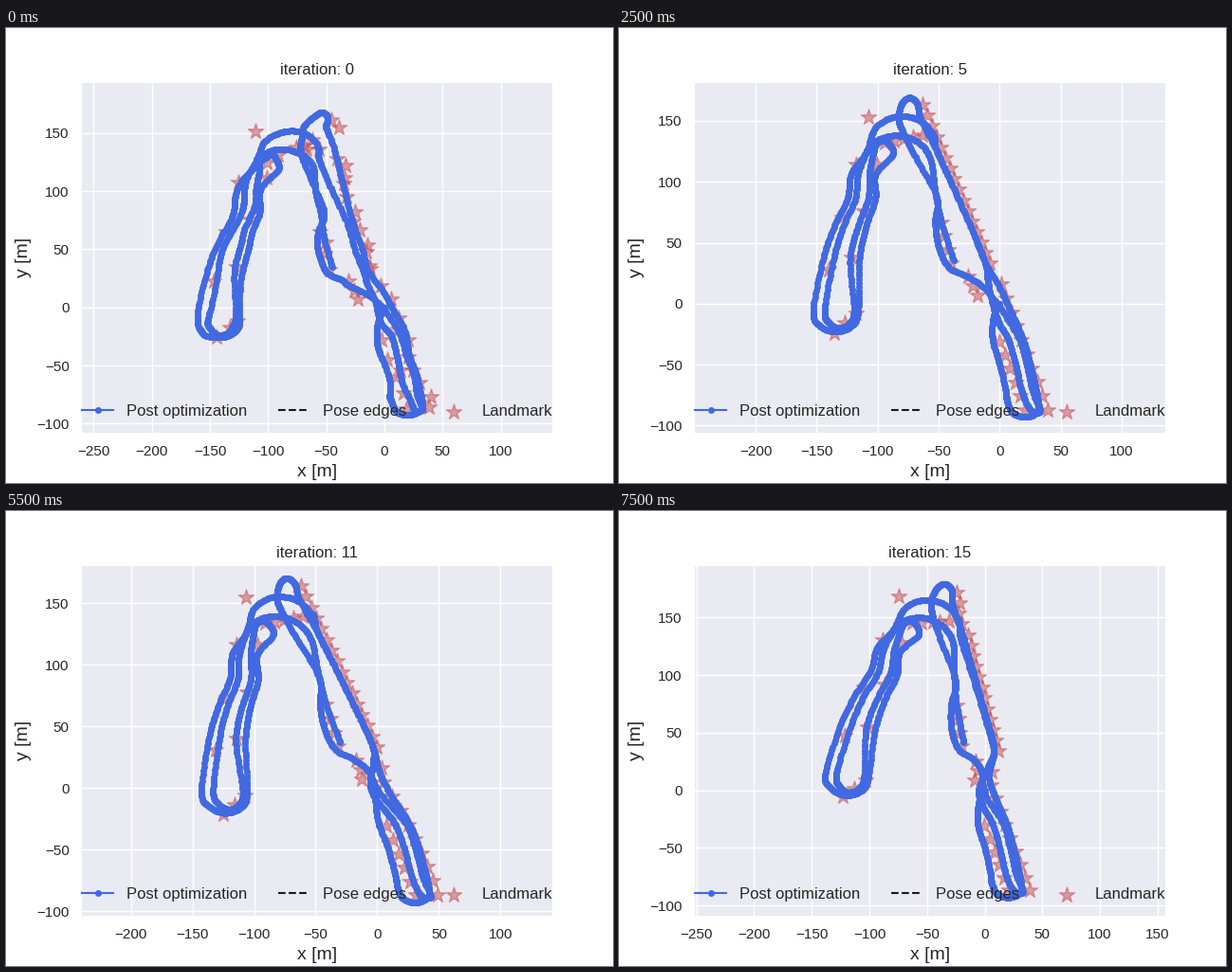
A matplotlib script for the animation above (8 s loop, 640 by 480 pixels).

```python
import numpy as np
import matplotlib.pyplot as plt
from matplotlib.animation import FuncAnimation
from matplotlib.ticker import MultipleLocator

FRAMES, INTERVAL = 16, 500
INK, BLUE, RED = "#262626", "royalblue", "#C44E52"
LEFT, RIGHT, TOP, BOTTOM = 80, 576, 57.6, 427.2

plt.rcParams.update({
    "font.family": "Liberation Sans", "text.color": INK,
    "axes.labelcolor": INK, "xtick.color": INK, "ytick.color": INK,
})

# Per step: view scale and pixel of the map origin, then the map's
# northern shift, lean and tilt, southern kick and swing of the top hook.
POSES = np.array([
    (0, 1.2267, 399.0, 294.8, -8, .04, -.025, 0, 21),
    (3, 1.2610, 400.2, 292.3, -3, .02, -.02, 0, 8),
    (5, 1.2860, 401.4, 290.8, 0, 0, 0, 0, 0),
    (9, 1.2970, 397.3, 290.6, 8, -.055, .01, 6, 0),
    (11, 1.299, 391.4, 292.2, 10, -.055, .02, 10.5, 0),
    (13, 1.279, 386.7, 294.0, 11, -.02, .05, 9, 0),
    (15, 1.215, 385.5, 294.7, 15.5, .12, .14, 0, 4),
])


def arc(cx, cy, rx, ry, start, stop, n=5):
    a = np.radians(np.linspace(start, stop, n))
    return np.column_stack([cx + rx * np.cos(a), cy + ry * np.sin(a)])


def west(gap):
    """One of four side by side strands in the west, going north."""
    p = np.array([(-145, 36), (-136, 63), (-125, 86), (-122, 106)], float)
    p[:, 0] += gap * (1 - p[:, 1] / 250)
    return p


def south(gap):
    """One of the side by side strands in the south, going south."""
    return np.array([(-6, -29), (0, -50), (5, -72)]) + (gap, 0)


def smooth(p, n=16):
    """Catmull-Rom curve through the points."""
    q = np.vstack([p[:1], p, p[-1:]])
    a, b, c, d = (q[i:len(q) - 3 + i, None] for i in range(4))
    t = np.linspace(0, 1, n, endpoint=False)[None, :, None]
    curve = 0.5 * (2 * b + (c - a) * t + (2 * a - 5 * b + 4 * c - d) * t**2
                   + (3 * b - a - 3 * c + d) * t**3)
    return np.vstack([curve.reshape(-1, 2), p[-1:]])


CLIMB = [(-12, 34), (-23, 61), (-38, 95), (-52, 126)]

# The whole drive in metres, in its resting shape.
ROUTE = np.vstack([
    [(0, 0), (-5, -10)], south(0), arc(20, -80, 14, 13, 180, 325, 4),
    south(25)[::-1], [(9, -6), (0, 13)], CLIMB,
    arc(-74, 152, 9, 17, 0, 180),
    [(-80, 142), (-70, 122), (-52, 88), (-53, 67), (-50, 46), (-42, 30),
     (-28, 23), (-14, 14), (0, -3)],
    south(22), [(33, -88), (25, -87)], south(13)[::-1],
    [(0, -17), (-6, 0), (-10, 20)], CLIMB,
    arc(-80, 128, 28, 26, 25, 180), west(10)[::-1],
    arc(-131.5, -5, 12, 15, 180, 360), west(26),
    arc(-96, 122, 8, 12, 180, 0), west(35)[::-1],
    arc(-134.5, -6, 18.5, 17, 0, -180), west(0),
    arc(-85, 112, 29, 26, 165, 15), [(-53, 92), (-48, 67), (-38, 36)],
])
HOOK = np.exp(-((np.arange(len(ROUTE)) - 19.5) / 4) ** 2)

# Landmarks stand in rows: first, last, count.
ROWS = [((-63, 163), (-8, 33), 16), ((1, 16), (39, -87), 10),
        ((-48, 67), (-40, 33), 4), ((-26, 22), (-18, 7), 3),
        ((0, -31), (21, -87), 6), ((-94, 132), (-63, 138), 5),
        ((-118, 114), (-140, 28), 3), ((-101, 114), (-122, 38), 3),
        ((-118, -8), (-136, -24), 3), ((-108, 153), (-108, 153), 1)]
STARS = np.vstack([np.linspace(*row) for row in ROWS])
GAPS = STARS[:, None] - ROUTE[None]
STAR_HOOK = HOOK[np.argmin(np.hypot(GAPS[..., 0], GAPS[..., 1]), axis=1)]
JITTER = np.random.default_rng(4).normal(0, 2.5, STARS.shape)


def bend(p, hooked, shift, lean, tilt, kick, hook):
    """Shear the north about the origin while the south is pushed sideways."""
    x, y = p.T
    t = np.clip((y - x) / 45, 0, 1)
    north = t * t * (3 - 2 * t)
    push = kick * (1 - np.exp(np.minimum(y, 0) / 25))
    return np.column_stack([
        x + north * (shift + lean * y) + (1 - north) * push + hook * hooked,
        y - north * tilt * x])


fig = plt.figure(figsize=(6.4, 4.8), dpi=100, facecolor="white")
ax = fig.add_axes([0.125, 0.11, 0.775, 0.77], facecolor="#EAEAF2")
ax.set_axisbelow(True)
ax.grid(color="white", lw=1)
for spine in ax.spines.values():
    spine.set_visible(False)
for axis in (ax.xaxis, ax.yaxis):
    axis.set_major_locator(MultipleLocator(50))
ax.tick_params(length=6, pad=3.5, labelsize=11, bottom=False, left=False)
ax.set_xlabel("x [m]", fontsize=14)
ax.set_ylabel("y [m]", fontsize=14)
title = ax.set_title("", fontsize=12)

stars = ax.scatter([], [], s=150, marker="*", color=RED, alpha=0.5,
                   label="Landmark", zorder=2)
route, = ax.plot([], [], "o-", color=BLUE, ms=4, lw=1.5,
                 label="Post optimization", zorder=3)
edges, = ax.plot([], [], "--", color="#1a1a1a", lw=1.5, label="Pose edges")
ax.legend(handles=[route, edges, stars], loc="lower left", ncol=3, mode="expand",
          bbox_to_anchor=(0, 0.0412, 1, 0.1), borderpad=0, borderaxespad=0,
          frameon=False, fontsize=12, scatterpoints=1)


def draw(step):
    scale, x0, y0, *pose = (np.interp(step, POSES[:, 0], c) for c in POSES.T[1:])
    rough = 0.35 ** step
    path = smooth(bend(ROUTE, HOOK, *pose))
    s = np.arange(len(path))
    path += rough * np.column_stack([np.sin(s / 7) + 0.5 * np.sin(s / 4),
                                     0.6 * np.sin(s / 5.5)])
    route.set_data(*path.T)
    stars.set_offsets(bend(STARS, STAR_HOOK, *pose) + rough * JITTER)
    ax.set_xlim((LEFT - x0) / scale, (RIGHT - x0) / scale)
    ax.set_ylim((y0 - BOTTOM) / scale, (y0 - TOP) / scale)
    title.set_text(f"iteration: {step}")
    return route, stars, title


anim = FuncAnimation(fig, draw, frames=FRAMES, interval=INTERVAL, repeat=True)
plt.show()
```
